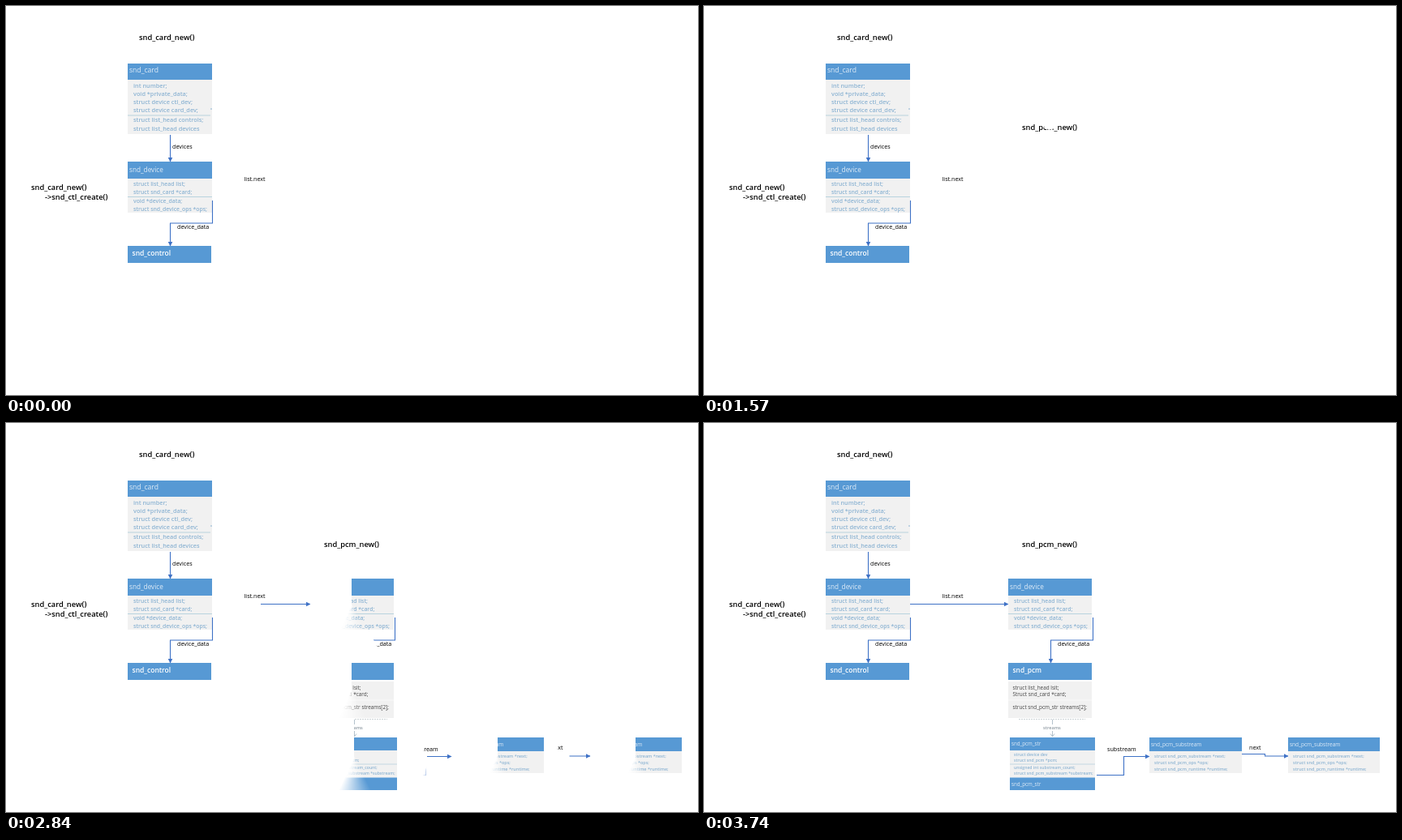
These frames come from a looping animation (853 by 480 pixels, 3800 ms). An HTML page:

```html
<!DOCTYPE html>
<html lang="en">
<head>
<meta charset="utf-8">
<title>Sound card structures</title>
<style>
  html, body { margin: 0; width: 100%; height: 100%; overflow: hidden; background: #fff; }
  svg { position: absolute; }
  text { font-family: "Open Sans", "Noto Sans", sans-serif; white-space: pre; }
  .link { fill: none; stroke: #3f72c6; stroke-width: 1.1; marker-end: url(#tip); }
</style>
</head>
<body>
<svg width="0" height="0">
  <marker id="tip" markerUnits="userSpaceOnUse" markerWidth="6" markerHeight="6" refX="5.5" refY="3" orient="auto">
    <path d="M0 0L6 3L0 6z" fill="#3f72c6"/>
  </marker>
</svg>
<script>
const LOOP = 3800, STEP = 60, SWEEP_END = 3740;
const BLUE = '#5799d4', PALE = '#e0ecf7', MEMBER = '#8db4d3';

// Text is placed by its left edge and its middle line.
const text = (x, y, str, size, color = '#000', weight = 400) =>
  `<text x="${x}" y="${y + size * 0.34}" font-size="${size}" font-weight="${weight}" fill="${color}">` +
  str.replace('>', '&gt;') + '</text>';
const rect = (x, y, w, h, color) =>
  `<rect x="${x}" y="${y}" width="${w}" height="${h}" fill="${color}"/>`;
const link = d => `<path class="link" d="${d}"/>`;
const label = (x, y, str) => text(x, y, str, 7.2);
const call = (x, y, str) => text(x, y, str, 9.3, '#000', 600);
const rows = (x, ys, lines, size, color = MEMBER, weight = 600) =>
  lines.map((line, i) => text(x, ys[i], line, size, color, weight)).join('');

// pivotY is the height of the sweep centre inside the layer.
function layer(x, y, w, h, content, pivotY = h / 2) {
  document.body.insertAdjacentHTML('beforeend',
    `<svg style="left:${x}px;top:${y}px" width="${w}" height="${h}" viewBox="${x} ${y} ${w} ${h}">${content}</svg>`);
  const el = document.body.lastElementChild;
  el.pivotY = pivotY;
  return el;
}

const device = x =>
  rect(x, 192, 104, 21, BLUE) + rect(x, 213, 104, 42, '#f1f1f1') +
  rect(x, 235, 104, 1, '#b9d3de') +
  text(x + 2, 202.5, 'snd_device', 8.2, PALE, 500) +
  rows(x + 7, [220, 229.5, 241, 250.5], ['struct list_head list;', 'struct snd_card *card;',
    'void *device_data;', 'struct snd_device_ops *ops;'], 6.85);

const substream = x =>
  rect(x, 388, 114, 17, BLUE) + rect(x, 405, 114, 27, '#f1f1f1') +
  text(x + 2, 396.5, 'snd_pcm_substream', 6.5, PALE) +
  rows(x + 6, [411, 419, 427], ['struct snd_pcm_substream *next;', 'struct snd_pcm_ops *ops;',
    'struct snd_pcm_runtime *runtime;'], 5.45);

layer(0, 0, 853, 480,
  call(164, 39, 'snd_card_new()') +
  call(31, 224, 'snd_card_new()') + call(48, 236, '->snd_ctl_create()') +
  rect(150, 71, 104, 20, BLUE) + rect(150, 91, 104, 67, '#f1f1f1') +
  rect(150, 134.5, 102, 1, '#b9d3de') + rect(252.5, 126, 1, 2, MEMBER) +
  text(152, 79, 'snd_card', 8.6, PALE, 500) +
  rows(157, [98.5, 108.5, 118.5, 128.5, 141, 151.5], ['int number;', 'void *private_data;',
    'struct device ctl_dev;', 'struct device card_dev;',
    'struct list_head controls;', 'struct list_head devices'], 7.3) +
  link('M202.5 159V192') + label(205, 173.5, 'devices') +
  device(150) + label(293.5, 213.5, 'list.next') +
  link('M254.5 240V268H202.5V296') + label(211, 272.5, 'device_data') +
  rect(150, 296, 103, 21, BLUE) + text(155.5, 305.5, 'snd_control', 8.5, '#fff', 600));

const pcmCall = layer(384, 137, 84, 25, call(392, 150, 'snd_pcm_new()'));

const wheels = [
  layer(375, 192, 103, 63, device(375)),
  layer(254, 217, 121, 13, link('M254 223.5H375')),
  layer(423, 240, 61, 56, link('M479.5 240V268H427.5V296')),
  layer(436, 266, 42, 13, label(436, 272.5, 'device_data')),
  layer(375, 296, 103, 69,
    rect(375, 296, 103, 21, BLUE) + rect(375, 319, 103, 45, '#f1f1f1') +
    rect(375, 341.5, 103, 1, '#fafafa') +
    text(380.5, 305.5, 'snd_pcm', 8.4, '#fff', 600) +
    rows(380.5, [327, 335, 350.5], ['struct list_head lsit;', 'Struct snd_card *card;',
      'struct snd_pcm_str streams[2];'], 6.4, '#444', 400), 32),
  layer(388, 364, 82, 24,
    '<path d="M388 365.5H470" stroke="#ccd3d6" stroke-dasharray="2 1"/>' +
    '<path d="M429.5 366V387M427 383.5L429.5 387L432 383.5" fill="none" stroke="#b4c2cc"/>' +
    rect(417, 372, 24, 8, '#fff') + text(418, 376.5, 'streams', 5.6, '#8f9aa3', 600), 24),
  layer(377, 388, 105, 65,
    rect(377, 388, 105, 16, BLUE) + rect(377, 404, 105, 33.5, '#f1f1f1') +
    rect(377, 437.5, 105, 16, BLUE) + rect(377, 420.5, 105, 1, '#c3d8e2') +
    text(379, 396, 'snd_pcm_str', 6.2, PALE) + text(379, 445.5, 'snd_pcm_str', 6.2, PALE) +
    rows(382, [409, 416, 425, 432.5], ['struct device dev', 'struct snd_pcm *pcm;',
      'unsigned int substream_count;', 'struct snd_pcm_substream *substream;'], 5.1), 24),
  layer(484, 407, 70, 31, link('M484 434.5H517.5V411.5H549')),
  layer(496, 396, 38, 13, label(497, 402.5, 'substream')),
  layer(549, 388, 114, 44, substream(549)),
  layer(671, 394, 18, 13, label(672, 400.5, 'next')),
  layer(663, 405, 63, 10, link('M663 408.5H691.5V411H720')),
  layer(720, 388, 113, 44, substream(720)),
];

// An elliptical iris with a soft rim closes towards the centre.
function iris(el, t) {
  const r = 38.7 * (1 - (t - 730) / 1090);
  el.style.visibility = t < 730 ? 'hidden' : 'visible';
  el.style.webkitMaskImage = r > 0.5
    ? `radial-gradient(${r}px ${r * 0.43}px at 42px 12px, #0000 65%, #000)` : 'none';
}

// A soft-edged hand sweeps clockwise from twelve o'clock.
function wheel(el, t) {
  const lead = 0.208 * (t - 1853);
  el.style.visibility = lead <= 0 ? 'hidden' : 'visible';
  el.style.webkitMaskImage = t < SWEEP_END
    ? `conic-gradient(at 50% ${el.pivotY}px, #000 ${lead - 52}deg, #0000 ${lead}deg)` : 'none';
}

function draw(now) {
  let t = now % LOOP;
  const base = t < 730 ? 0 : t < 2300 ? 730 : 2300;
  t = base && base + Math.floor((t - base) / STEP) * STEP;
  iris(pcmCall, t);
  wheels.forEach(el => wheel(el, t));
}

const start = performance.now();
function tick() {
  draw(performance.now() - start);
  requestAnimationFrame(tick);
}
tick();
</script>
</body>
</html>
```
